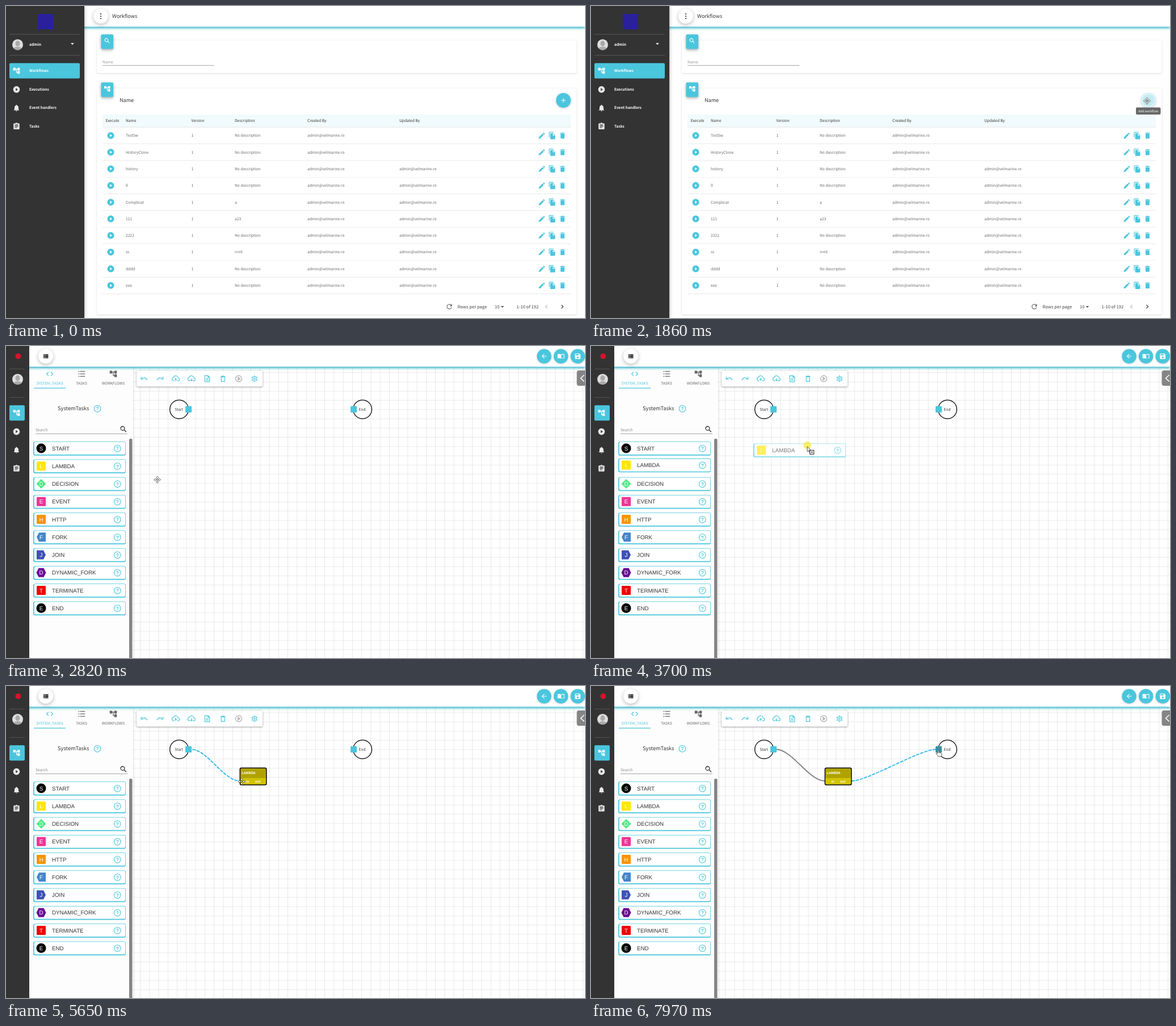
Write an HTML page with a canvas that moves like this. It is 1020 by 549 pixels and loops after 8 s.

```html
<!DOCTYPE html>
<html lang="en">
<head>
<meta charset="utf-8">
<title>Workflow editor</title>
<style>
html, body { margin: 0; width: 100%; height: 100%; overflow: hidden; background: #fff; }
canvas { display: block; width: 100vw; height: 100vh; }
</style>
</head>
<body>
<canvas id="stage"></canvas>
<script>
const W = 1020, H = 549, LOOP = 8000;
const CYAN = '#4ac6dd', DARK = '#333', GREY = '#666';
const SANS = '"Noto Sans CJK JP","Noto Sans CJK SC","Noto Sans CJK",sans-serif';
const ARIAL = '"Liberation Sans",Arial,sans-serif';
const canvas = document.getElementById('stage');
const dpr = window.devicePixelRatio || 1;
canvas.width = W * dpr;
canvas.height = H * dpr;
const c = canvas.getContext('2d');

// Icons live on a 24-unit grid.
const FILLED = {
  tree: 'M22 11V3h-7v3H9V3H2v8h7V8h2v10h4v3h7v-8h-7v3h-2V8h2v3z',
  play: 'M12 2a10 10 0 1 0 0 20 10 10 0 1 0 0-20zM10 16.5v-9l6 4.5z',
  bell: 'M12 22a2 2 0 0 0 2-2h-4a2 2 0 0 0 2 2zM18 16v-5c0-3-1.6-5.6-4.5-6.3V4a1.5 1.5 0 0 0-3 0v.7C7.6 5.4 6 7.9 6 11v5l-2 2v1h16v-1z',
  clip: 'M19 3h-4.2a3 3 0 0 0-5.6 0H5a2 2 0 0 0-2 2v14a2 2 0 0 0 2 2h14a2 2 0 0 0 2-2V5a2 2 0 0 0-2-2zM11 4h2v1h-2zM7 7h10v2H7zM7 11h10v2H7zM7 15h7v2H7z',
  search: 'M15.5 14h-.8l-.3-.3A6.5 6.5 0 1 0 13.7 14.4l.3.3v.8l5 5 1.5-1.5zM9.5 14a4.5 4.5 0 1 1 0-9 4.5 4.5 0 0 1 0 9z',
  pencil: 'M3 17.2V21h3.8L17.8 9.9l-3.7-3.7zM20.7 7a1 1 0 0 0 0-1.4l-2.3-2.3a1 1 0 0 0-1.4 0l-1.8 1.8 3.7 3.7z',
  copy: 'M16 1H4a2 2 0 0 0-2 2v14h2V3h12zM15 5H8a2 2 0 0 0-2 2v14a2 2 0 0 0 2 2h11a2 2 0 0 0 2-2V11zM14 12V6.5l5.5 5.5z',
  trash: 'M6 19a2 2 0 0 0 2 2h8a2 2 0 0 0 2-2V7H6zM19 4h-3.5l-1-1h-5l-1 1H5v2h14z',
  plus: 'M19 13h-6v6h-2v-6H5v-2h6V5h2v6h6z',
  refresh: 'M17.6 6.4A8 8 0 1 0 19.7 14h-2.1A6 6 0 1 1 12 6c1.7 0 3.1.7 4.2 1.8L13 11h7V4z',
  left: 'M15.4 7.4 14 6l-6 6 6 6 1.4-1.4L10.8 12z',
  right: 'M10 6 8.6 7.4 13.2 12l-4.6 4.6L10 18l6-6z',
  caret: 'M7 10l5 5 5-5z',
  rows: 'M4 5h4v4H4zM9 5h12v4H9zM4 10h4v4H4zM9 10h12v4H9zM4 15h4v4H4zM9 15h12v4H9z',
  list: 'M3 4h3v2H3zM8 4h14v2H8zM3 11h3v2H3zM8 11h14v2H8zM3 18h3v2H3zM8 18h14v2H8z',
  code: 'M9.4 16.6 4.8 12l4.6-4.6L8 6l-6 6 6 6zM14.6 16.6l4.6-4.6-4.6-4.6L16 6l6 6-6 6z',
  back: 'M20 11H7.8l5.6-5.6L12 4l-8 8 8 8 1.4-1.4L7.8 13H20z',
  book: 'M12 7C10 5 6 4 1 5.5V19c5-1.5 9-.5 11 1 2-1.5 6-2.5 11-1V5.5C18 4 14 5 12 7zM13 8.5c2-1.5 5-2 8-1.5v10.5c-3-.5-6 0-8 1z',
  save: 'M17 3H5a2 2 0 0 0-2 2v14a2 2 0 0 0 2 2h14a2 2 0 0 0 2-2V7zM12 19a3 3 0 1 1 0-6 3 3 0 0 1 0 6zM15 9H5V5h10z'
};
const CLOUD = 'M8 18H6a5 5 0 0 1-.5-9.9A7 7 0 0 1 19 10a4 4 0 0 1 0 8h-3';
const LINED = {
  undo: 'M3 13C9 7 17 8 21 16M3 6v7h7',
  redo: 'M21 13C15 7 7 8 3 16M21 6v7h-7',
  upload: CLOUD + 'M12 19v-7M9 14.5l3-3 3 3',
  download: CLOUD + 'M12 11v7M9 15.5l3 3 3-3',
  doc: 'M5 3h9l5 5v13H5zM14 3v5h5M8 12h8M8 16h8',
  bin: 'M7 7h10v13H7zM5 5h14M10 4h4',
  playRing: 'M21 12a9 9 0 1 1-18 0 9 9 0 1 1 18 0zM10 8v8l6-4z',
  gear: 'M18.5 12a6.5 6.5 0 1 1-13 0 6.5 6.5 0 1 1 13 0zM14.5 12a2.5 2.5 0 1 1-5 0 2.5 2.5 0 1 1 5 0zM12 2v4M12 18v4M3.4 7l3 1.7M17.6 15.3l3 1.7M3.4 17l3-1.7M17.6 8.7l3-1.7'
};
const SHAPES = {
  disc: 'M8.5 0a8.5 8.5 0 1 1-17 0 8.5 8.5 0 1 1 17 0z',
  square: 'M-7-8h14l1 1v14l-1 1h-14l-1-1v-14z',
  diamond: 'M0-8.5 8.5 0 0 8.5-8.5 0z',
  fork: 'M-8 0-4-8H8V8H-4z',
  join: 'M8 0 4-8H-8V8H4z',
  hex: 'M-8.5 0-4.5-8h9l4 8-4 8h-9z'
};
const POINTERS = {
  move: 'M0-6 2-3.8 0-1.6-2-3.8zM0 6 2 3.8 0 1.6-2 3.8zM-6 0-3.8-2-1.6 0-3.8 2zM6 0 3.8-2 1.6 0 3.8 2zM0-1.4 1.4 0 0 1.4-1.4 0z',
  hand: 'M-2-5q1-1 2 0v4l4 1q1 .5 1 2l-1 4h-5l-4-5q0-1.5 1.5-1l1.5 1z',
  arrow: 'M0 0v9l2-2 1.5 3 1.3-.6-1.4-3h2.6z'
};
const paths = {};
const path = d => paths[d] || (paths[d] = new Path2D(d));

function text(s, x, y, size, color = GREY, weight = 400, align = 'left', family = SANS) {
  c.font = `${weight} ${size}px ${family}`;
  c.textAlign = align;
  c.fillStyle = color;
  c.fillText(s, x, y + size * 0.36);
}
function rect(x, y, w, h, color, r = 0, shadow = '', blur = 0, drop = 0) {
  c.save();
  if (shadow) {
    c.shadowColor = shadow;
    c.shadowBlur = blur * dpr;
    c.shadowOffsetY = drop * dpr;
  }
  c.fillStyle = color;
  c.beginPath();
  c.roundRect(x, y, w, h, r);
  c.fill();
  c.restore();
}
const disc = (x, y, r, color, shadow, blur, drop) =>
  rect(x - r, y - r, 2 * r, 2 * r, color, r, shadow, blur, drop);
function icon(name, x, y, size, color) {
  c.save();
  c.translate(x - size / 2, y - size / 2);
  c.scale(size / 24, size / 24);
  if (FILLED[name]) {
    c.fillStyle = color;
    c.fill(path(FILLED[name]), 'evenodd');
  } else {
    c.strokeStyle = color;
    c.lineWidth = 1.9;
    c.stroke(path(LINED[name]));
  }
  c.restore();
}
function help(x, y) {
  c.strokeStyle = CYAN;
  c.lineWidth = 1.1;
  c.beginPath();
  c.arc(x, y, 5.8, 0, 7);
  c.stroke();
  text('?', x, y, 8.5, CYAN, 700, 'center', ARIAL);
}
const clamp = v => Math.max(0, Math.min(1, v));

function header(x, name) {
  rect(0, 0, W, 36.5, '#fff', 0, '#35b6cd', 4, 2);
  disc(x, 18, 13, '#fff', 'rgba(0,0,0,.28)', 7, 2);
  if (name) icon(name, x, 18, 12, '#222');
  else for (const dy of [-4, 0, 4]) disc(x, 18 + dy, 1.1, '#222');
}
function avatar(y) {
  c.save();
  c.beginPath();
  c.arc(20.5, y, 9.5, 0, 7);
  c.clip();
  rect(10, y - 10, 21, 20, '#dedede');
  c.fillStyle = '#aaa';
  c.beginPath();
  c.ellipse(20.5, y - 2, 4, 5, 0, 0, 7);
  c.ellipse(20.5, y + 9, 8, 5.5, 0, 0, 7);
  c.fill();
  c.restore();
}

const MENU = [['tree', 'Workflows'], ['play', 'Executions'], ['bell', 'Event handlers'], ['clip', 'Tasks']];
function menu(y, width, labelAlpha) {
  rect(6, y - 13.5, width - 14, 27, CYAN, 2);
  MENU.forEach(([name, label], i) => {
    const rowY = y + i * 32.4 + (i ? 0.5 : 0);
    icon(name, 18.5, rowY, 14, i ? '#e8e8e8' : '#fff');
    c.globalAlpha = labelAlpha;
    text(label, 41, rowY - 0.5, 6.5, '#fff', 700);
    c.globalAlpha = 1;
  });
}

function wideSidebar() {
  rect(0, 0, 138, H, DARK, 0, 'rgba(0,0,0,.35)', 6);
  rect(56, 14, 27, 27, '#2a209c');
  rect(6, 49.5, 124, 0.8, '#666');
  avatar(68);
  text('admin', 41, 67.5, 6.7, '#fff', 700);
  icon('caret', 117, 66.5, 14, '#fff');
  rect(6, 86.5, 124, 0.8, '#666');
  menu(114, 138, 1);
}
function narrowSidebar(t) {
  const left = 1 - clamp((t - 1960) / 266);
  const w = 41 + 97 * left ** 3;
  const open = clamp((w - 41) / 13), y = 4 * open;
  const alpha = clamp((w - 54) / 84) + 0.1 * open;
  c.save();
  c.beginPath();
  c.rect(0, 0, w, H);
  c.clip();
  rect(0, 0, w, H, DARK);
  disc(21.5 + 6.5 * open, 18 + 2.5 * open, 5 + 3 * open, '#d3142c');
  rect(6, 40 + y, w - 14, 0.8, '#5c5c5c');
  avatar(58.5 + y);
  c.globalAlpha = alpha;
  text('admin', 30, 58.5 + y, 6.7, '#fff', 700);
  c.globalAlpha = 1;
  rect(6, 90 + y, w - 14, 0.8, '#5c5c5c');
  menu(117.7 + y, w, alpha);
  c.restore();
}

const NAMES = ['TestSw', 'HistoryClone', 'history', 'll', 'Complicat', '111', '2222', 'ss', 'dddd', 'eee'];
const NOTES = { 4: 'a', 5: 'a23', 7: 'rrrr6' };
const MAIL = 'admin@velmarine.ro';
const COLUMNS = [['Execute', 175.5], ['Name', 211], ['Version', 326.5], ['Description', 403], ['Created By', 531], ['Updated By', 693]];

function card(y, h, name) {
  rect(160, y, 845.5, h, '#fff', 3, 'rgba(0,0,0,.16)', 3, 0.7);
  rect(167.5, y - 10.5, 21.5, 25.5, CYAN, 2, 'rgba(0,0,0,.35)', 5, 2);
  icon(name, 178.3, y + 0.8, 12.5, '#fff');
}
function listPage(t) {
  rect(0, 0, W, H, '#fefefe');
  header(167);
  text('Workflows', 187, 18, 9, DARK, 500);
  card(60.5, 57.5, 'search');
  text('Name', 170, 99, 6.8, '#999');
  rect(170, 104, 197, 0.8, '#8c8c8c');
  card(145, 398, 'tree');
  text('Name', 200, 166, 9.1, DARK, 500);

  const hover = clamp((t - 1300) / 250);
  disc(982, 166, 13, CYAN, 'rgba(0,0,0,.2)', 4, 1);
  icon('plus', 982, 166, 13, '#fff');
  if (hover) {
    c.globalAlpha = hover;
    disc(982, 166, 13, '#e4f6fa');
    disc(982, 166, 10.8, '#c6ebf3');
    c.globalAlpha = 1;
  }

  rect(170, 191, 825, 22, '#f1fafc');
  rect(170, 212.7, 825, 0.7, '#dedede');
  for (const [label, x] of COLUMNS) text(label, x, 202, 6.65, DARK, 500);
  NAMES.forEach((name, i) => {
    const y = 228 + i * 29.3;
    icon('play', 184.5, y, 14.5, CYAN);
    text(name, 211, y, 6.65);
    text('1', 326.5, y, 6.65);
    text(NOTES[i] || 'No description', 403, y, 6.65);
    text(MAIL, 531, y, 6.65);
    if (i > 1) text(MAIL, 693, y, 6.65);
    ['pencil', 'copy', 'trash'].forEach((n, k) => icon(n, 944 + 18.2 * k, y, 14, CYAN));
    rect(170, y + 14.3, 825, 0.7, '#e2e2e2');
  });
  icon('refresh', 781, 529, 14, GREY);
  text('Rows per page', 795.5, 529, 7.65, '#444');
  text('10', 861, 529, 7.5, '#444');
  icon('caret', 874.5, 529, 13, '#444');
  text('1-10 of 192', 899.5, 529, 7.65, '#444');
  icon('left', 952, 529, 14, '#b8b8b8');
  icon('right', 980, 529, 14, DARK);
  wideSidebar();

  c.globalAlpha = clamp((t - 1450) / 150);
  rect(960, 178.5, 43.5, 12.5, '#686868', 2);
  text('Add workflow', 981.7, 184.8, 5.45, '#fff', 500, 'center');
  c.globalAlpha = 1;
}

const TASKS = [
  ['START', 'disc', '#000'], ['LAMBDA', 'square', '#ffe600'], ['DECISION', 'diamond', '#4fe884'],
  ['EVENT', 'square', '#ee3497'], ['HTTP', 'square', '#f79400'], ['FORK', 'fork', '#4585cb'],
  ['JOIN', 'join', '#3f51b5'], ['DYNAMIC_FORK', 'hex', '#6a0d93'], ['TERMINATE', 'square', '#ee0000'],
  ['END', 'disc', '#000']
];
function tile([label, shape, color], dx, y) {
  c.save();
  c.translate(dx, y);
  rect(48, -11.7, 163, 24.5, '#fff', 3);
  c.fillStyle = CYAN;
  c.beginPath();
  c.roundRect(48, -11.7, 163, 24.5, 3);
  c.roundRect(49.7, -10.9, 160.5, 22, 2);
  c.fill('evenodd');
  c.translate(62, 0);
  c.fillStyle = color;
  c.fill(path(SHAPES[shape]));
  text(label[0], 0, 0, 9.8, '#fff', 400, 'center', ARIAL);
  text(label, 19, 0, 9.75, DARK, 400, 'left', ARIAL);
  help(134.3, 0.3);
  c.restore();
}
function palette(t) {
  rect(41, 38, 183, H, '#fdfdfd', 0, 'rgba(0,0,0,.22)', 4);
  [['code', 'SYSTEM_TASKS', CYAN], ['list', 'TASKS', GREY], ['tree', 'WORKFLOWS', GREY]].forEach(([n, label, color], i) => {
    icon(n, 77 + 56 * i, 49, 15, color);
    text(label, 77 + 56 * i, 65.5, 6.55, color, 400, 'center');
  });
  rect(49, 73.5, 56, 1.3, CYAN);
  text('SystemTasks', 91, 110, 9.3, DARK);
  help(161, 110.3);
  text('Search', 52, 148, 6.8, '#8a8a8a');
  rect(52, 154, 162, 0.8, '#888');
  icon('search', 207, 146.5, 15, '#222');
  rect(217, 163, 5.5, H, '#848484', [2.5, 2.5, 0, 0]);
  const lifted = t > 2950 && t < 4150;
  TASKS.forEach((task, i) => tile(task, 0, 180 + 31.25 * i - (lifted && i === 1 ? 1.7 : 0)));
}
function terminal(x, label, portX, hot) {
  c.beginPath();
  c.arc(x, 111.5, 16.4, 0, 7);
  c.fillStyle = '#fff';
  c.fill();
  c.strokeStyle = '#000';
  c.lineWidth = 1.3;
  c.stroke();
  text(label, x - 0.5, 111.7, 6.5, DARK, 400, 'center');
  rect(portX, 106, 11, 11, hot ? '#3c8fa3' : CYAN, 1);
}
function link(x1, y1, x2, y2, live, t) {
  c.save();
  c.lineWidth = 1.8;
  c.strokeStyle = live ? '#31b5ee' : '#808080';
  if (live) {
    c.setLineDash([6, 1.7]);
    c.lineDashOffset = -t / 1000 * 15.4;
  }
  c.beginPath();
  c.moveTo(x1, y1);
  c.bezierCurveTo(x1 + 29, y1, x2 - 29, y2, x2, y2);
  c.stroke();
  c.restore();
}
function lambdaNode() {
  rect(411.5, 143.5, 48, 31.3, '#0a0a0a', 3);
  rect(413, 145, 45, 17, '#b0a300', [2, 2, 0, 0]);
  rect(413, 162, 45, 11.3, '#d2c300', [0, 0, 2, 2]);
  text('LAMBDA', 415.3, 153, 5.9, '#fff', 700);
  text('in', 423, 167.7, 5.7, '#fff', 700);
  text('out', 438.7, 167.7, 5.7, '#fff', 700);
}
function editorPage(t, p) {
  rect(0, 0, W, H, '#fff');
  const pitch = 16.25;
  for (let x = 236.2; x < W; x += pitch) rect(x, 38, 0.8, H, '#e3e3e3');
  for (let y = 46.4; y < H; y += pitch) rect(224, y, W, 0.8, '#e3e3e3');

  if (t >= 4840) t < 5600 ? link(326, 111.5, p.x, p.y, true, t) : link(326, 111.5, 412, 167, t < 6800, t);
  if (t >= 6800) t < 7650 ? link(459, 167, p.x, p.y, true, t) : link(459, 167, 608, 111.5, true, t);
  terminal(305, 'Start', 316, t > 4570 && t < 4950);
  terminal(628, 'End', 607, t > 7600);
  if (t > 4140) lambdaNode();

  rect(230, 43.5, 222, 28, '#fff', 2, 'rgba(0,0,0,.45)', 3, 0.7);
  Object.keys(LINED).forEach((n, i) =>
    icon(n, 243.5 + 27.75 * i, 57.5, 14.5, n === 'playRing' ? '#a4a4a4' : CYAN));
  rect(1005.5, 43, 18, 27, '#858585', 4);
  c.strokeStyle = '#fff';
  c.lineWidth = 1.5;
  c.stroke(path('M1018.5 51l-6 5.7 6 5.7'));

  palette(t);
  header(70, 'rows');
  ['back', 'book', 'save'].forEach((n, i) => {
    disc(948 + 29.6 * i, 18, 12.8, CYAN, 'rgba(0,0,0,.18)', 3, 1);
    icon(n, 948 + 29.6 * i, 18, 13, '#fff');
  });
  narrowSidebar(t);

  if (t >= 3350 && t < 4140) {
    c.globalAlpha = 0.65;
    tile(TASKS[1], p.x - 143, p.y + 6.3);
    c.globalAlpha = 1;
  }
}

// Pointer route: time, x, y
const ROUTE = [
  [500, 1024, 555], [850, 1010, 420], [1260, 979.5, 167], [1930, 979.5, 167], [2090, 818, 221],
  [2290, 472, 288], [2490, 472, 288], [3020, 143, 203.5], [3350, 143, 203.5], [3700, 381, 177],
  [4100, 426, 138], [4160, 426, 138], [4600, 324, 116.5], [4840, 324, 116.5], [5560, 415, 168],
  [5850, 415, 168], [6100, 466, 171], [6420, 453.5, 168.5], [6800, 453.5, 168.5],
  [7230, 597, 110], [7600, 611, 114], [7900, 613, 118]
];
function pointerAt(t) {
  const i = ROUTE.findIndex(k => k[0] > t);
  const [t1, x1, y1] = ROUTE[i < 0 ? ROUTE.length - 1 : Math.max(0, i - 1)];
  if (i <= 0) return { x: x1, y: y1 };
  const [t2, x2, y2] = ROUTE[i], k = (t - t1) / (t2 - t1);
  return { x: x1 + (x2 - x1) * k, y: y1 + (y2 - y1) * k };
}
function pointer(t, { x, y }) {
  const carrying = t >= 3350 && t < 4140;
  const pressed = carrying || (t >= 4840 && t < 5600) || (t >= 6800 && t < 7650);
  if (pressed) disc(x, y - 2, 6.8, 'rgba(250,232,50,.75)');
  const onPort = (t > 4570 && t < 4950) || t > 7600;
  c.save();
  c.translate(x, y);
  c.fillStyle = '#fff';
  c.strokeStyle = '#3a3a3a';
  c.lineWidth = 0.85;
  const shape = path(POINTERS[carrying ? 'arrow' : onPort ? 'hand' : 'move']);
  c.fill(shape);
  c.stroke(shape);
  if (carrying) {
    rect(4, 6, 8, 8, '#222');
    rect(5, 7, 6, 6, '#fff');
    c.stroke(path('M8 8v4M6 10h4'));
  }
  c.restore();
}

function draw(t) {
  c.setTransform(dpr, 0, 0, dpr, 0, 0);
  c.textRendering = 'geometricPrecision';
  const p = pointerAt(t);
  t < 1970 ? listPage(t) : editorPage(t, p);
  if (t >= 500) pointer(t, p);
}
const start = performance.now();
function frame() {
  draw((performance.now() - start) % LOOP);
  requestAnimationFrame(frame);
}
frame();
</script>
</body>
</html>
```
